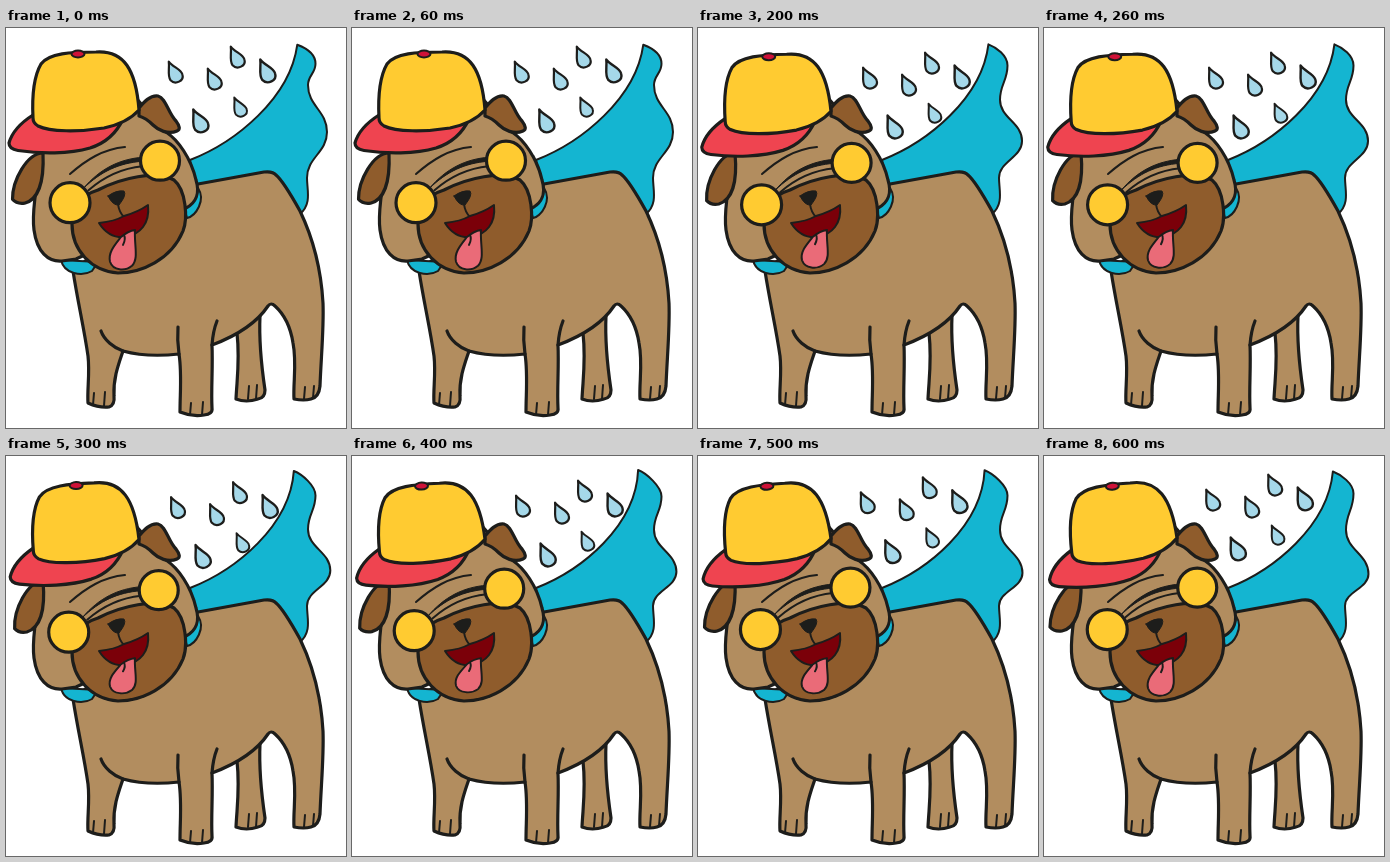
Recreate the animation shown at these times as an HTML page. Size 340x400 px, loop 0.7 s.

```html
<!DOCTYPE html>
<html lang="en">
<head>
<meta charset="utf-8">
<title>Caped pug</title>
<style>
  html, body { margin: 0; width: 100%; height: 100%; overflow: hidden; background: #fff; }
  svg { display: block; width: 340px; height: 400px; }
  path, circle, ellipse { stroke: #1d1d1b; stroke-width: 3.2; stroke-linecap: round; stroke-linejoin: round; }
  .tan { fill: #b28d5f; }
  .brown { fill: #8f5c2c; }
  .blue { fill: #14b5d1; }
  .yellow { fill: #ffcb31; }
  .red { fill: #ef4450; }
  .crimson { fill: #cf1238; }
  .maroon { fill: #7b0009; }
  .pink { fill: #ea6b78; }
  .black { fill: #1d1d1b; }
  .drop { fill: #a5d8e9; }
  .line { fill: none; }
  .thin { stroke-width: 2; }
  .hair { stroke-width: 1; }
</style>
</head>
<body>
<svg viewBox="0 0 340 400">
  <path id="cape" class="blue thin"/>

  <!-- body -->
  <path class="tan" d="M231 305C234 332 231 350 230 371Q240 375 252 371Q259 370 259 362C255 335 253 310 254 288"/>
  <path class="tan" d="M67 243C72 275 78 300 82 328C84 345 81 362 82 375Q93 380 103 379Q109 377 108 368C107 350 113 335 117 323C135 328 155 328 173 326C176 345 174 365 174 384Q186 389 198 387Q207 386 206 380C205 360 207 340 206 317C230 308 250 296 262 278Q265 274 269 278C280 288 285 302 287 315C291 335 287 355 288 371Q298 373 305 371Q313 369 314 358C315 330 318 300 317 275C315 240 306 208 294 183C284 165 276 152 270 147Q267 143 258 144L192 156L120 200Z"/>
  <path class="line" d="M95 303C98 312 108 320 117 323M172 299Q171 312 173 326M211 293Q207 303 206 317"/>
  <path class="line thin" d="M88 365L87 377M99 364L98 378M185 375L184 387M197 374L196 387M243 358L242 371M251 357L250 371M299 359L298 371M308 358L307 370"/>

  <!-- collar and head -->
  <path class="blue thin" d="M192 160C200 172 190 188 181 190L176 172Z"/>
  <path class="blue thin" d="M55 232C58 246 76 249 86 243L92 234Z"/>
  <path class="tan" d="M37 124C33 143 25 180 28 202C31 224 42 234 56 233L70 231L180 180C190 175 194 165 190 152C185 130 172 112 160 104L130 70L40 100Z"/>
  <path id="ear" class="brown" d="M37 125C21 125 6 152 6 171Q10 176 18 175C31 172 38 155 37 125Z"/>
  <path class="brown" d="M133 80C138 74 144 67 152 68C160 70 162 85 170 93Q176 101 171 103C162 107 152 102 147 97Q140 90 133 88Z"/>
  <path class="line thin" d="M64 146C80 132 97 121 119 119"/>
  <path class="brown" d="M66 196C66 178 76 167 92 162C115 150 150 142 168 152C180 162 182 190 177 203C165 232 135 245 112 245C85 243 66 222 66 196Z"/>
  <path class="black hair" d="M102 168Q110 162 118 163Q121 167 113 177Q107 178 102 168Z"/>
  <path class="line thin" d="M112 176Q113 184 118 189"/>
  <path class="maroon thin" d="M93 195C103 194 111 192 118 188Q132 184 142 177C144 196 134 206 120 209Q103 211 93 195Z"/>
  <g id="tongue">
    <path class="pink thin" d="M115 209C108 218 102 225 104 234C107 243 119 244 126 238C133 231 128 217 129 202Q122 203 115 209Z"/>
    <path class="line thin" d="M118 207Q120 211 117 217"/>
  </g>

  <g id="glasses">
    <path class="black hair" d="M77 160C94 140 113 131 136 129L136 133C112 135 95 143 77 160Z"/>
    <path class="line thin" d="M82 162C98 148 116 140 136 138"/>
    <circle class="yellow" cx="63.5" cy="174.500" r="20"/>
    <circle class="yellow" cx="153.5" cy="132.500" r="19.500"/>
  </g>

  <g id="cap">
    <path class="red" d="M27 87C16 94 6 104 3 115Q3 121 12 122.500C35 126 63 126 84 120C100 115 111 104 117 91Z"/>
    <path class="yellow" d="M27 90C26 70 28 48 35 36C43 25 65 24 90 24C118 22 130 42 133 82C124 92 112 97 98 100C73 104 44 104 32 98Q27 95 27 90Z"/>
    <ellipse class="crimson thin" cx="72" cy="26" rx="6.500" ry="3.500"/>
  </g>
  <g id="drops"></g>
</svg>
<script>
const STEP = 100, POSES = 7;
const el = id => document.getElementById(id);
const move = (id, value) => el(id).setAttribute("transform", value);

// Each drop: x, y, scale.
const drops = [[169, 46, 1.1], [208, 53, 1.1], [231, 31, 1.1], [261, 45, 1.2], [234, 81, 1], [194, 95, 1.2]];
el("drops").innerHTML = drops.map(([x, y, size]) =>
  `<path class="drop thin" d="M0-12C1-6 7-1 6 4C5 10-4 10-6 4C-7-1-2-6 0-12Z"
    transform="translate(${x} ${y}) rotate(-26) scale(${size})"/>`).join("");

// Joins two points with upright tangents at both ends.
function wave(x1, y1, x2, y2) {
  const k = (y2 - y1) * .45;
  return `C${x1} ${y1 + k} ${x2} ${y2 - k} ${x2} ${y2}`;
}

// The tip swings while the folds of the right edge slide down and settle.
function capePath(pose, swing) {
  const settle = 1 - Math.exp(-pose);
  const tipX = 289 - 3 * swing(4.3), tipY = 15.6 - 1.6 * swing(4.3);
  const upper = [309.5, 38 + 2.5 * swing(4)];
  const notch = [302, 57 + 17 * settle];
  const lower = [321 + 3.5 * settle, 104 + 8 * settle + pose];
  const hem = [301, 150];
  return `M184 132C230 114 284 70 ${tipX} ${tipY}` +
    `C${tipX + 8} ${tipY + 3} ${upper[0]} ${upper[1] - 10} ${upper}` +
    wave(...upper, ...notch) + wave(...notch, ...lower) + wave(...lower, ...hem) +
    `C301 162 306 176 294 186L250 160L190 170Z`;
}

function draw(now) {
  const pose = Math.floor(now / STEP) % POSES;
  // One cosine per loop, highest at the given pose.
  const swing = peak => Math.cos(2 * Math.PI * (pose - peak) / POSES);

  el("cape").setAttribute("d", capePath(pose, swing));
  move("cap", `translate(0 ${1.5 * Math.sin(Math.PI * pose / 6)}) rotate(${-.65 * pose} 132 82)`);
  move("ear", `rotate(${-1.7 - 1.7 * swing(2.5)} 37 125)`);
  move("glasses", `translate(${swing(.7) - .3} ${.6 + 1.7 * swing(2)})`);
  move("tongue", `translate(0 203) scale(1 ${.93 - .07 * swing(4)}) translate(0 -203)`);
  move("drops", `translate(${.5 + 1.5 * swing(2.5)} ${3 + 4 * swing(3)})`);
  requestAnimationFrame(draw);
}
draw(0);
</script>
</body>
</html>
```
